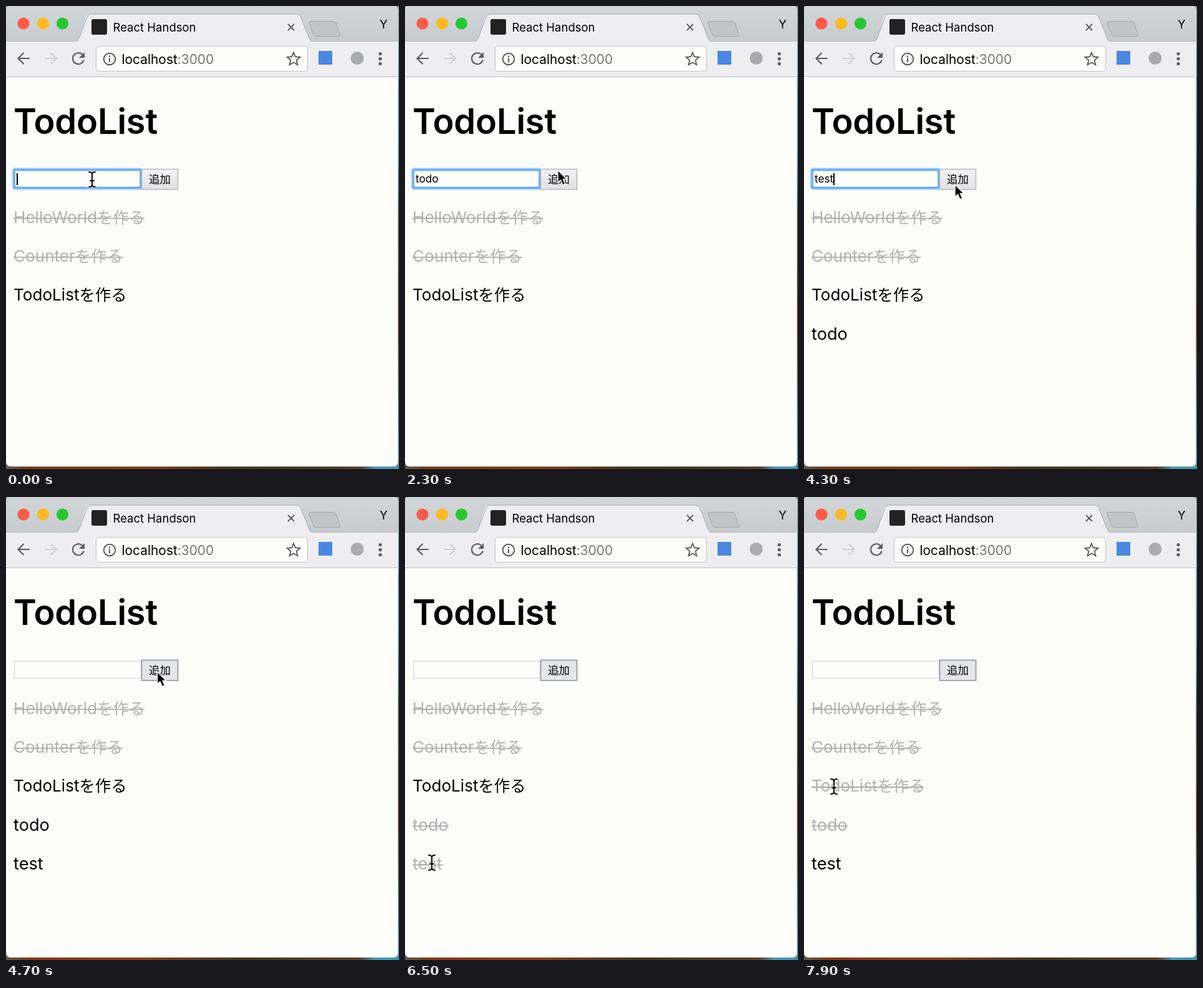
An HTML page that plays this animation: 630x742 px, repeating every 8 s.

```html
<!DOCTYPE html>
<html lang="ja">
<head>
<meta charset="utf-8">
<title>TodoList</title>
<style>
html, body { margin: 0; width: 100%; height: 100%; overflow: hidden; background: #fdfdfc; }
svg { position: absolute; left: 0; top: 0; width: 630px; height: 742px; }
svg, .entry { font-family: Inter, "Noto Sans CJK JP", "Noto Sans CJK", sans-serif; font-optical-sizing: none; }
.icon { fill: none; stroke: #5c5c5e; stroke-width: 2.2; }
.item { font-size: 26.1px; color: #000; stroke-width: 0; }
.item text { fill: currentColor; stroke: none; }
.item line { stroke: #aaa; }
.latin { font-size: 27.2px; }
.jp { font-size: 25.4px; }
.done { color: #b3b3b3; stroke-width: 1.8px; }

/* one shared 8 s clock; state changes are hard steps */
.anim, .item, .entry b { animation: 8s step-end infinite; }
#list { animation-name: list; }
#todo { animation-name: todo; }
#test { animation-name: test; }
#ring { animation-name: focus; }
#press { animation-name: press; }
#caret { animation-name: blink; }
#word1 { animation-name: type1; }
#word2 { animation-name: type2; }
#beam { animation-name: beam; }
#arrow { animation-name: arrow; }
#mouse { animation: move 8s ease-in-out infinite; }

.entry { position: absolute; left: 17px; top: 266px; height: 22px; display: flex; align-items: center; font-size: 17.2px; line-height: 22px; color: #000; }
.entry b { flex: none; overflow: hidden; font-weight: 400; max-width: 0; }
#caret { flex: none; width: 1.5px; height: 19px; background: #000; }

@keyframes list {
  0% { color: #000; stroke-width: 0; }
  96.25%, 100% { color: #b3b3b3; stroke-width: 1.8px; }
}
@keyframes todo {
  0% { visibility: hidden; color: #000; stroke-width: 0; }
  31.25% { visibility: visible; }
  66.25%, 100% { visibility: visible; color: #b3b3b3; stroke-width: 1.8px; }
}
@keyframes test {
  0% { visibility: hidden; color: #000; stroke-width: 0; }
  57.5% { visibility: visible; }
  76.25% { color: #b3b3b3; stroke-width: 1.8px; }
  85%, 100% { visibility: visible; color: #000; stroke-width: 0; }
}
@keyframes focus {
  0% { visibility: visible; }
  31.25% { visibility: hidden; }
  37.5% { visibility: visible; }
  57.5%, 100% { visibility: hidden; }
}
@keyframes press {
  0% { visibility: hidden; }
  31.25% { visibility: visible; }
  37.5% { visibility: hidden; }
  57.5%, 100% { visibility: visible; }
}
@keyframes blink {
  0% { opacity: 1; }
  5% { opacity: 0; }
  8.75% { opacity: 1; }
  25% { opacity: 0; }
  37.5% { opacity: 1; }
  55%, 100% { opacity: 0; }
}
@keyframes type1 {
  0% { max-width: 0; }
  8.75% { max-width: .36em; }
  11.25% { max-width: .97em; }
  15% { max-width: 1.58em; }
  18.75% { max-width: 9em; }
  31.25%, 100% { max-width: 0; }
}
@keyframes type2 {
  0% { max-width: 0; }
  42.5% { max-width: .36em; }
  43.75% { max-width: .95em; }
  46.25% { max-width: 1.49em; }
  48.75% { max-width: 9em; }
  57.5%, 100% { max-width: 0; }
}
@keyframes move {
  0%, 20% { transform: translate(138px, 278px); }
  27.5%, 33% { transform: translate(245px, 263px); }
  38.5%, 48.75% { transform: translate(175px, 270px); }
  53.5%, 54.5% { transform: translate(242px, 286px); }
  56.25%, 58.5% { transform: translate(243px, 279px); }
  65%, 70% { transform: translate(47px, 528px); }
  74.5%, 87% { transform: translate(43px, 586px); }
  94%, 100% { transform: translate(48px, 464px); }
}
@keyframes beam {
  0% { visibility: visible; }
  25% { visibility: hidden; }
  35% { visibility: visible; }
  51.25% { visibility: hidden; }
  63.75% { visibility: visible; }
  71.25% { visibility: hidden; }
  73.25% { visibility: visible; }
  88.75% { visibility: hidden; }
  92.5%, 100% { visibility: visible; }
}
@keyframes arrow {
  0% { visibility: hidden; }
  25% { visibility: visible; }
  35% { visibility: hidden; }
  51.25% { visibility: visible; }
  63.75% { visibility: hidden; }
  71.25% { visibility: visible; }
  73.25% { visibility: hidden; }
  88.75% { visibility: visible; }
  92.5%, 100% { visibility: hidden; }
}
</style>
</head>
<body>
<svg viewBox="0 0 630 742">
  <defs>
    <linearGradient id="floor">
      <stop offset="0" stop-color="#5d5a50"/>
      <stop offset=".06" stop-color="#7a3a1c"/>
      <stop offset=".35" stop-color="#7d4322"/>
      <stop offset=".6" stop-color="#45351f"/>
      <stop offset=".9" stop-color="#5a4028"/>
      <stop offset=".94" stop-color="#4c9ab4"/>
      <stop offset="1" stop-color="#4a93ad"/>
    </linearGradient>
    <linearGradient id="side" x2="0" y2="1">
      <stop offset="0" stop-color="#7f8d92"/>
      <stop offset=".3" stop-color="#4e8f9b"/>
      <stop offset=".45" stop-color="#3f4a42"/>
      <stop offset=".7" stop-color="#4a3524"/>
      <stop offset="1" stop-color="#4f8d98"/>
    </linearGradient>
    <linearGradient id="bar" x2="0" y2="1">
      <stop offset="0" stop-color="#d3d6d8"/>
      <stop offset="1" stop-color="#c8cbce"/>
    </linearGradient>
    <linearGradient id="face" x2="0" y2="1">
      <stop offset="0" stop-color="#f2f2f3"/>
      <stop offset="1" stop-color="#e2e2e5"/>
    </linearGradient>
    <filter id="soft" x="-10%" y="-50%" width="120%" height="200%"><feGaussianBlur stdDeviation="1"/></filter>
    <clipPath id="win"><path d="M0 6Q0 0 6 0H622.500Q628.500 0 628.500 6V730Q628.500 738 620.500 738H8Q0 738 0 730Z"/></clipPath>
    <path id="ibeam" d="M-5 -12Q0 -12 0 -8Q0 -12 5 -12M0 -8V8M-5 12Q0 12 0 8Q0 12 5 12M-3 2H3"/>
  </defs>

  <rect width="630" height="742" fill="url(#side)"/>
  <rect y="728" width="630" height="14" fill="url(#floor)"/>

  <g clip-path="url(#win)">
    <rect width="630" height="742" fill="#fdfdfc"/>
    <rect width="630" height="56" fill="url(#bar)"/>
    <rect y="56" width="630" height="57" fill="#eeeef0"/>
    <path d="M0 56.500H630M0 113.500H630" stroke="#b9babc"/>
    <path d="M113 57C119 54 122 35 128 19Q130 13 135 13H467Q471 13 473 18C480 35 484 54 490 57Z" fill="#eeeef0"/>
    <path d="M113 56.500C117 55 119 47 122 39L130 18Q132 13 136 13H466Q470 13 472 17L482 41C485 48 487 55 490 56.500" fill="none" stroke="#a5a6a8"/>
    <path d="M489 24.500H525Q528 24.500 529 27L535 45Q536 48.500 533 48.500H497Q494 48.500 493 46L486 28Q485 24.500 489 24.500Z" fill="#c3c4c6" stroke="#a3a4a6"/>
  </g>

  <circle cx="28" cy="28" r="9.600" fill="#fc5b4b"/>
  <circle cx="59.500" cy="28" r="9.600" fill="#fdb924"/>
  <circle cx="90.500" cy="28" r="9.600" fill="#27c732"/>
  <rect x="137" y="21" width="25" height="25" rx="3" fill="#222"/>
  <text x="171.500" y="41" font-size="18.500">React Handson</text>
  <text x="599" y="36" font-size="18.500">Y</text>

  <g class="icon">
    <path d="M452 29L462 39M462 29L452 39" stroke-width="1.900"/>
    <path d="M38 84H20M28.500 75L19.500 84L28.500 93"/>
    <path d="M62 84H80M71.500 75L80.500 84L71.500 93" stroke="#d0d0d2"/>
    <path d="M122.500 78A9 9 0 1 0 124.700 86.500"/>
    <path d="M126 74V83H117Z" fill="#5c5c5e" stroke="none"/>
    <rect x="144.500" y="64.500" width="339" height="40" rx="4" fill="#fdfdfc" stroke="#c6c6ca" stroke-width="1.200"/>
    <circle cx="166" cy="85" r="9.300" stroke-width="2"/>
    <path d="M166 83.500V90M166 79.500V82"/>
    <path d="M461 74.500L463.900 81.300L471.300 82L465.700 86.900L467.400 94.200L461 90.300L454.600 94.200L456.300 86.900L450.700 82L458.100 81.300Z" stroke-width="1.900"/>
  </g>
  <text x="185.500" y="93" font-size="20.900">localhost<tspan fill="#767676">:3000</tspan></text>
  <rect x="501" y="72" width="22" height="22" fill="#4c87df"/>
  <circle cx="563" cy="83.500" r="10.500" fill="#a9abac"/>
  <g fill="#5c5c5e">
    <circle cx="600" cy="76.500" r="2.600"/>
    <circle cx="600" cy="84.500" r="2.600"/>
    <circle cx="600" cy="92.500" r="2.600"/>
  </g>

  <text x="12" y="205" font-size="56" font-weight="600" letter-spacing="-.2">TodoList</text>

  <rect x="13.500" y="263" width="203" height="27.500" fill="#fdfdfc" stroke="#d3d3dc" stroke-width="1.200"/>
  <g id="ring" class="anim" fill="none">
    <rect x="12.500" y="262" width="204" height="30" rx="2" stroke="#70b1f5" stroke-width="4" filter="url(#soft)"/>
    <rect x="13.500" y="263" width="202" height="28" stroke="#5ea5f0" stroke-width="1.500"/>
  </g>
  <rect x="217.500" y="261.500" width="58" height="32.500" fill="url(#face)" stroke="#b0b0b4" stroke-width="1.300"/>
  <rect id="press" class="anim" x="217.500" y="261.500" width="58" height="32.500" fill="#e5e6ea" stroke="#a2a2a8" stroke-width="1.900"/>
  <text x="229" y="283.800" font-size="17.500">追加</text>

  <g class="item done">
    <text x="12" y="347.500">HelloWorld<tspan class="jp">を作る</tspan></text>
    <line x1="12" y1="340.300" x2="221.500" y2="340.300"/>
  </g>
  <g class="item done">
    <text x="12" y="410">Counter<tspan class="jp">を作る</tspan></text>
    <line x1="12" y1="402.700" x2="187.500" y2="402.700"/>
  </g>
  <g class="item" id="list">
    <text x="12" y="472.300">TodoList<tspan class="jp">を作る</tspan></text>
    <line x1="12" y1="465" x2="192" y2="465"/>
  </g>
  <g class="item latin" id="todo">
    <text x="12" y="534.800">todo</text>
    <line x1="12" y1="527.300" x2="70" y2="527.300"/>
  </g>
  <g class="item latin" id="test">
    <text x="12" y="597">test</text>
    <line x1="12" y1="589.600" x2="61" y2="589.600"/>
  </g>
</svg>

<div class="entry"><b id="word1">todo</b><b id="word2">test</b><i id="caret" class="anim"></i></div>

<svg viewBox="0 0 630 742">
  <g id="mouse">
    <g id="beam" class="anim" fill="none" stroke-linecap="round">
      <use href="#ibeam" stroke="#fff" stroke-width="3.600"/>
      <use href="#ibeam" stroke="#000" stroke-width="1.900"/>
    </g>
    <path id="arrow" class="anim" d="M0 0V20L4.500 16L8 24L12 22.300L8.500 14.500H14.500Z" fill="#000" stroke="#fff" stroke-width="1.500" stroke-linejoin="round"/>
  </g>
</svg>
</body>
</html>
```
